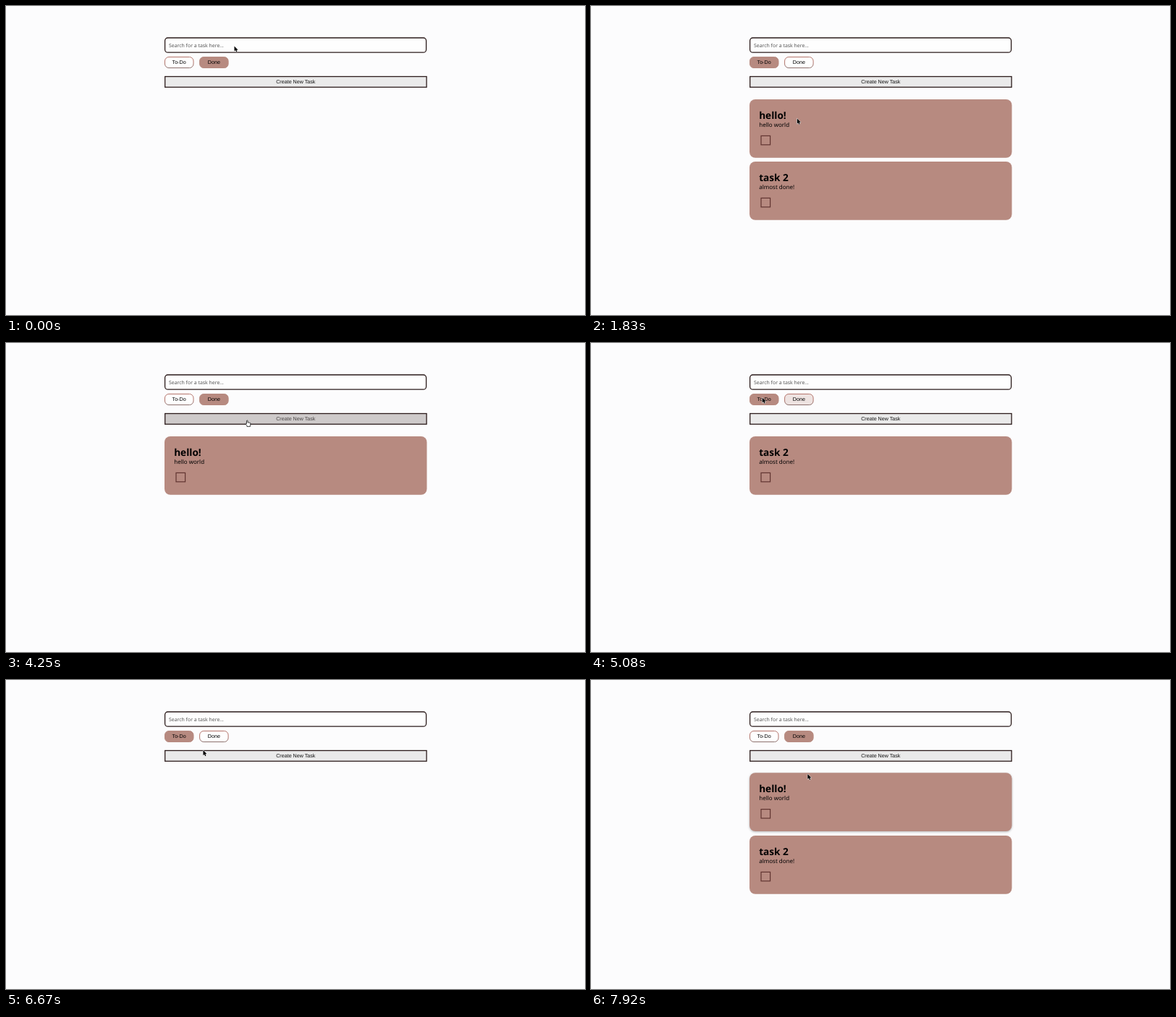
Animation of 800x427 px, one loop 8000 ms. Source, as an HTML page:

```html
<!DOCTYPE html>
<html lang="en">
<head>
<meta charset="utf-8">
<title>Task list</title>
<style>
  html, body { margin: 0; width: 100%; height: 100%; overflow: hidden; background: #fcfcfd; }
  svg { display: block; width: 800px; height: 427px; text-rendering: geometricPrecision; }
  .ui { font: 7.15px "Liberation Sans", Arial, sans-serif; text-anchor: middle; }
  .body { font: 8px "Noto Sans", sans-serif; }
  .title { font: 700 13.6px "Noto Sans", sans-serif; }
  .hint { font: 6.9px "Noto Sans", sans-serif; fill: #555; }
  .line { stroke: #2b1b1b; stroke-width: 1.3; }
</style>
</head>
<body>
<svg viewBox="0 0 800 427">
  <defs>
    <linearGradient id="rim" x1="0" y1="0" x2="0" y2="1">
      <stop offset=".5" stop-color="#b5756c"/><stop offset="1" stop-color="#8c706d"/>
    </linearGradient>
  </defs>
  <rect class="line" x="219.6" y="44" width="361" height="20.2" rx="4" fill="#fefefe"/>
  <text class="hint" x="225" y="57.2">Search for a task here...</text>
  <g id="todo" class="ui">
    <rect x="219.5" y="70.5" width="39.5" height="15" rx="5.5"/><text x="239.1" y="80.4">To-Do</text>
  </g>
  <g id="done" class="ui">
    <rect x="267.6" y="70.5" width="39.5" height="15" rx="5.5"/><text x="287.4" y="80.4">Done</text>
  </g>
  <g id="create" class="ui">
    <rect class="line" x="219.7" y="97.5" width="361.4" height="14.7"/><text x="400.3" y="107.3">Create New Task</text>
  </g>
  <g id="cards"></g>
  <circle id="ring" r="11.8" fill="none" stroke="#333" stroke-width="1"/>
  <path id="arrow" d="M0 0V7.1L1.6 5.6L2.8 8.2L4 7.6L2.9 5.2H5.1Z" stroke="#fff" stroke-width="1" paint-order="stroke"/>
  <path id="hand" d="M-.8.4Q0-.5.7.4L.9 3Q1.8 2.4 2.3 3.2Q3.2 2.7 3.6 3.5Q4.6 3.3 4.6 4.5L4.1 6.8V8.4H-.4V7.2L-2.7 4.7Q-2.2 3.6-.8 4.6Z" fill="#fff" stroke="#111" stroke-width=".8" stroke-linejoin="round"/>
</svg>
<script>
const LOOP = 8000, STEP = 1000 / 12, SLOT = 86;
const $ = id => document.getElementById(id);

// Tracks: [ms, value...]; repeated times make hard cuts.
const cursor = [
  [500, 315.5, 55.5], [800, 318, 85], [1000, 314, 109], [1160, 285, 108], [1330, 234, 82], [1410, 230, 75.5],
  [1500, 230, 75.5], [1833, 284.8, 155.5], [2080, 254, 178], [2330, 240.5, 185], [2600, 240.5, 186],
  [2833, 240.3, 193.5], [3000, 278, 77], [3080, 285, 71], [3170, 285, 71], [3340, 292, 108],
  [3600, 312, 138], [3760, 322, 132], [3920, 330, 110], [4080, 333.3, 107], [4250, 333.3, 107],
  [4420, 312, 103], [4670, 248, 78], [4750, 238, 74.5], [5250, 236, 76], [5500, 240, 105],
  [5750, 246, 150], [6000, 242, 179], [6166, 240.5, 185], [6340, 240.5, 185], [6660, 272, 98],
  [6830, 283, 74], [6920, 283, 74], [7083, 283, 78], [7330, 288, 94], [7600, 296, 118], [7916, 299.3, 130]
];
const todoFill = [[1290, 0], [1500, 1], [3160, 1], [3500, 0], [4580, 0], [4830, 1], [7000, 1], [7083, .8], [7400, 0]];
const doneFill = [[1490, 1], [1800, 0], [3000, 0], [3250, 1], [4830, 1], [5160, 0], [6750, 0], [6950, 1]];
const createHover = [[830, 0], [1000, 1], [1170, 1], [1400, 0], [3830, 0], [4080, 1], [4440, 1], [4670, 0]];
const lift = [
  [1840, 0], [2250, .9], [2580, .9], [2580, 0], [2830, .8], [2950, .9], [3080, .3], [3160, 0], [3450, 0],
  [3620, .5], [3760, .5], [3920, 0], [5560, 0], [5920, 1], [6330, 1], [6330, 0], [7680, 0], [7916, .7]
];
const boxHover = [[2160, 0], [2420, 1], [2833, 1], [3100, 0], [5990, 0], [6166, .6], [6330, .95], [6330, 0]];
const clicks = [167, 1417, 2500, 3083, 4750, 6250, 6833];
const handSpans = [[920, 1250], [2170, 2700], [3920, 4480], [5960, 6330]];
const lists = [
  [0, []], [1500, ["hello", "task"]], [2580, ["task"]], [3160, ["hello"]],
  [4830, ["task"]], [6330, []], [7000, ["hello", "task"]]
];

function sample(track, t) {
  const i = track.findIndex(k => k[0] > t);
  if (i === 0) return track[0].slice(1);
  if (i < 0) return track.at(-1).slice(1);
  const a = track[i - 1], b = track[i], p = (t - a[0]) / (b[0] - a[0]);
  return a.slice(1).map((v, j) => v + (b[j + 1] - v) * p);
}
const value = (track, t) => sample(track, t)[0];
const mix = (from, to, p) => `color-mix(in srgb, ${to} ${p * 100}%, ${from})`;
const show = (el, on) => { el.style.display = on ? "" : "none"; };

function makeCard(title, text) {
  const g = document.createElementNS("http://www.w3.org/2000/svg", "g");
  g.innerHTML = `<rect x="219" y="129" width="362.5" height="80.8" rx="8" fill="#b78a80"/>
    <text class="title" x="232.2" y="156">${title}</text>
    <text class="body" x="232.2" y="167">${text}</text>
    <rect x="235" y="179.4" width="12.6" height="12.4" stroke-width="1.2"/>`;
  $("cards").append(g);
  const [panel, box] = g.querySelectorAll("rect");
  return { g, panel, box };
}
const cards = { hello: makeCard("hello!", "hello world"), task: makeCard("task 2", "almost done!") };

function drawTab(id, fill) {
  const rect = $(id).firstElementChild;
  rect.style.fill = mix("#fefefe", "#b78a80", fill);
  rect.style.stroke = fill > .99 ? "#b78a80" : "url(#rim)";
}

function drawCard(card, slot, t) {
  show(card.g, slot >= 0);
  if (slot < 0) return;
  const up = slot ? 0 : value(lift, t), dark = slot ? 0 : value(boxHover, t);
  card.g.setAttribute("transform", `translate(0 ${slot * SLOT - up * 1.1})`);
  card.panel.style.filter = up ? `drop-shadow(${up * .8}px ${up * 2.4}px ${up * 2}px rgba(0,0,0,${up * .4}))` : "none";
  card.box.style.fill = mix("#b78a80", "#5c4c4a", dark);
  card.box.style.stroke = mix("#613531", "#352625", dark);
}

function draw(t) {
  drawTab("todo", value(todoFill, t));
  drawTab("done", value(doneFill, t));
  const hover = value(createHover, t), [bar, label] = $("create").children;
  bar.style.fill = mix("#eaeaea", "#cecaca", hover);
  label.style.fill = mix("#111", "#484444", hover);

  const list = lists.findLast(l => l[0] <= t)[1];
  for (const name in cards) drawCard(cards[name], list.indexOf(name), t);

  const at = `translate(${sample(cursor, t).join(" ")})`;
  const isHand = handSpans.some(([a, b]) => t >= a && t < b);
  for (const id of ["ring", "arrow", "hand"]) $(id).setAttribute("transform", at);
  show($("arrow"), !isHand);
  show($("hand"), isHand);
  show($("ring"), clicks.some(c => Math.abs(t - c) < STEP / 2));
}

const start = performance.now();
function tick() {
  const t = (performance.now() - start) % LOOP;
  draw(Math.floor((t + 4) / STEP) % 96 * STEP);
  requestAnimationFrame(tick);
}
tick();
</script>
</body>
</html>
```
